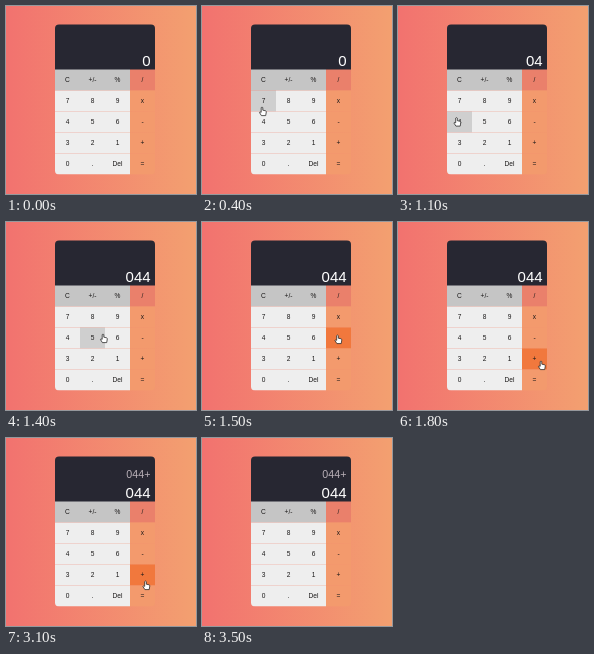
An HTML page that plays this animation: 190x188 px, repeating every 4.2 s.

```html
<!DOCTYPE html>
<html lang="en">
<head>
<meta charset="utf-8">
<title>Calculator</title>
<style>
html, body { margin: 0; width: 100%; height: 100%; overflow: hidden; }
svg { display: block; width: 100vw; height: 100vh; }
text { font-family: "Liberation Sans", Arial, sans-serif; }
#keys text { font-size: 6.6px; text-anchor: middle; fill: #1c1a1a; }
#upper, #lower { text-anchor: end; }
#upper { font-size: 10.7px; fill: #b9b0b8; }
#lower { font-size: 15px; fill: #fff; }
.cursor { fill: #fff; stroke: #222; stroke-width: .75; stroke-linejoin: round; }
</style>
</head>
<body>
<svg viewBox="0 0 190 188">
  <defs>
    <linearGradient id="sky" x2="1" y2="0">
      <stop stop-color="#f2726f"/>
      <stop offset="1" stop-color="#f3a070"/>
    </linearGradient>
    <clipPath id="body"><rect x="49" y="18.5" width="100" height="150" rx="4"/></clipPath>
  </defs>
  <rect width="190" height="188" fill="url(#sky)"/>
  <g clip-path="url(#body)">
    <rect x="49" y="18" width="100" height="46" fill="#272732"/>
    <g id="keys"></g>
  </g>
  <text id="upper" x="144.4" y="40"></text>
  <text id="lower" x="144.6" y="60"></text>
  <path id="hand" class="cursor" d="M-.8 .6Q0-.5 .8 .6V3.2L3.6 3.8Q4.4 4.1 4.3 5L3.7 8.6H-.6L-2.5 5.6Q-2.6 4.4-.8 5.3Z"/>
  <path id="arrow" class="cursor" d="M0 0V8L1.9 6.3 3.2 9.1 4.4 8.5 3.2 5.8H5.6Z"/>
</svg>
<script>
const LOOP = 4200;
const LEFT = 49, TOP = 63.5, W = 25, H = 21;
const LABELS = ["C", "+/-", "%", "/", "7", "8", "9", "x", "4", "5", "6", "-",
                "3", "2", "1", "+", "0", ".", "Del", "="];

// Pointer tip: time, x, y, shape
const POINTER = [
  [0, 0, 0, ""],
  [400, 60, 101, "hand"],
  [500, 60, 119, "hand"],
  [600, 59, 115, "hand"],
  [700, 58.5, 113, "hand"],
  [800, 58.5, 111.5, "hand"],
  [1400, 97, 112, "hand"],
  [1500, 135.5, 113, "hand"],
  [1600, 137, 120, "hand"],
  [1700, 140, 131, "hand"],
  [1800, 143, 139, "hand"],
  [3100, 139.5, 143, "hand"],
  [3200, 138, 143, "hand"],
  [3400, 167, 141, "arrow"],
  [3500, 0, 0, ""]
];

// Display: time, upper line, lower line
const DISPLAY = [
  [0, "", "0"],
  [1000, "", "04"],
  [1300, "", "044"],
  [2000, "044+", "044"]
];

const $ = id => document.getElementById(id);

function add(tag, attrs) {
  const el = document.createElementNS("http://www.w3.org/2000/svg", tag);
  for (const k in attrs) el.setAttribute(k, attrs[k]);
  return $("keys").appendChild(el);
}

function baseColor(row, col) {
  if (col === 3) return row ? "#f39a6d" : "#ea806b";
  return row ? "#eeeeee" : "#c5c5c5";
}

const keys = LABELS.map((label, i) => {
  const col = i % 4, row = Math.floor(i / 4);
  const x = LEFT + col * W, y = TOP + row * H;
  const rect = add("rect", { x, y, width: W, height: H });
  add("text", { x: x + W / 2, y: y + H / 2 + 2.3 }).textContent = label;
  return { rect, base: baseColor(row, col), hover: col === 3 ? "#f1783d" : "#cfcfcf" };
});

function keyAt(x, y) {
  const col = Math.floor((x - LEFT) / W), row = Math.floor((y - TOP) / H);
  return col >= 0 && col < 4 && row >= 0 && row < 5 ? row * 4 + col : -1;
}

const current = (steps, t) => steps.filter(s => s[0] <= t).pop();

function draw(t) {
  const [, x, y, shape] = current(POINTER, t);
  const [, upper, lower] = current(DISPLAY, t);
  const hot = shape ? keyAt(x, y) : -1;
  keys.forEach((k, i) => k.rect.setAttribute("fill", i === hot ? k.hover : k.base));
  $("upper").textContent = upper;
  $("lower").textContent = lower;
  for (const id of ["hand", "arrow"]) {
    $(id).setAttribute("visibility", id === shape ? "visible" : "hidden");
    $(id).setAttribute("transform", `translate(${x} ${y})`);
  }
}

const start = performance.now();
function tick() {
  draw((performance.now() - start) % LOOP);
  requestAnimationFrame(tick);
}
tick();
</script>
</body>
</html>
```
